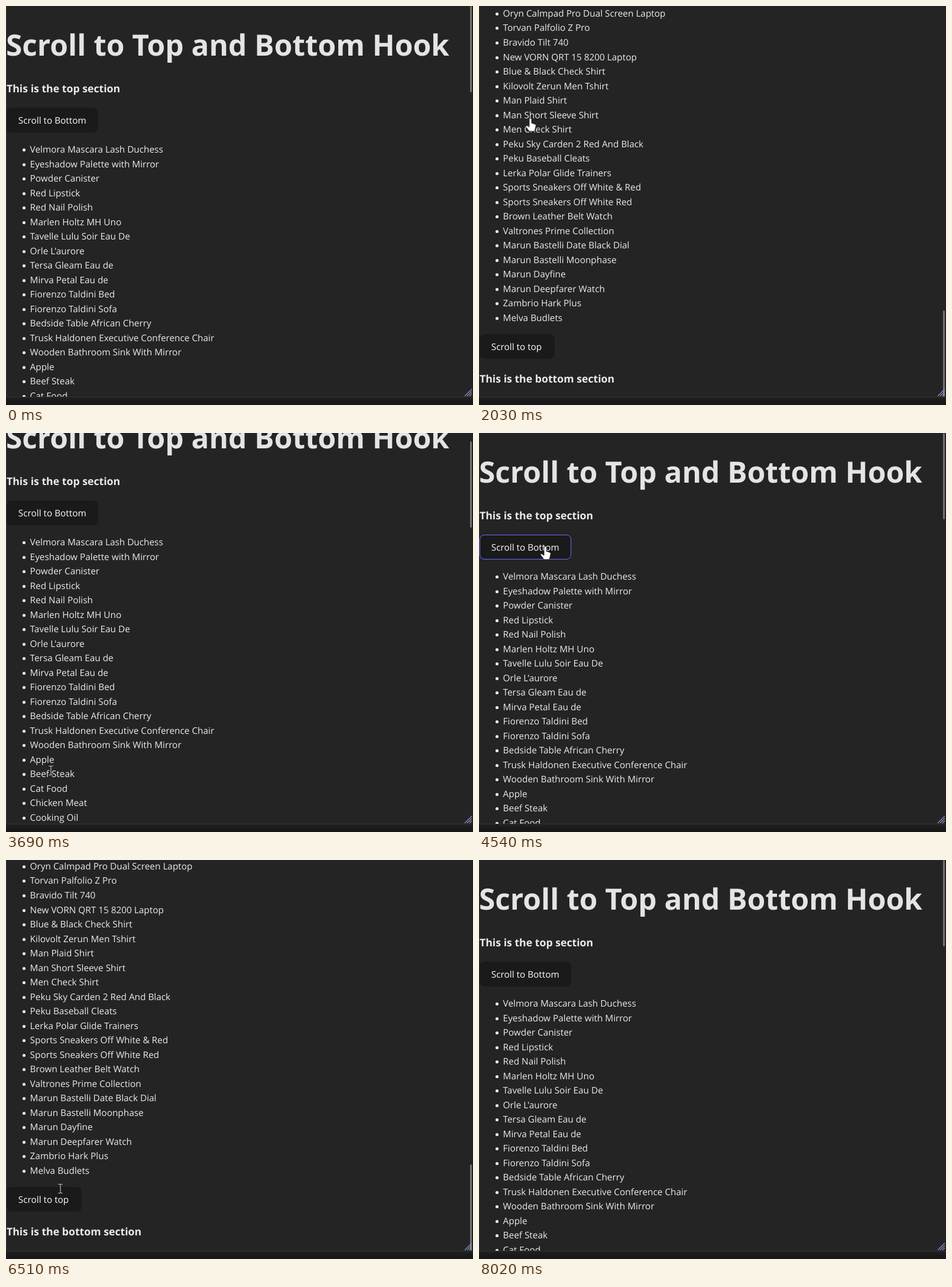
These frames come from a looping animation (790 by 675 pixels, 8480 ms). An HTML page:

```html
<!DOCTYPE html>
<html lang="en">
<head>
<meta charset="utf-8">
<title>Scroll hook demo</title>
<style>
  html, body { margin: 0; width: 100%; height: 100%; overflow: hidden; background: #242424; }
  svg { display: block; }
  text {
    font: 15.35px "Open Sans", "Noto Sans", sans-serif;
    fill: #ebebeb;
    text-rendering: geometricPrecision;
  }
  .h1 { font-size: 49.6px; font-weight: 700; fill: #e4e4e4; }
  .h3 { font-size: 17.7px; font-weight: 700; }
  .label { fill: #fafafa; }
  .button { fill: #1a1a1a; stroke: #1a1a1a; }
  .button.hover { stroke: #646cff; }
  .bullet { fill: #e8e8e8; }
</style>
</head>
<body>
<svg width="790" height="675" viewBox="0 0 790 675">
  <defs>
    <linearGradient id="shade" x2="0" y2="1">
      <stop offset="0" stop-color="#222223"/>
      <stop offset=".5" stop-color="#1a1a1b"/>
      <stop offset="1" stop-color="#17161a"/>
    </linearGradient>
  </defs>
  <rect width="790" height="675" fill="#242424"/>
  <g id="page"></g>
  <rect width="1" height="661" fill="#343436"/>
  <rect x="789" width="1" height="661" fill="#1c1c1d"/>
  <rect id="thumb" x="785" width="3" height="146" rx="1.5" fill="#757575"/>
  <path d="M776 660l12-12M780 660l8-8M784 660l4-4" stroke="#8c96d0" stroke-width="1.2" fill="none"/>
  <rect y="661" width="790" height="14" fill="url(#shade)"/>
  <rect y="661" width="790" height="1" fill="#333335"/>
  <g id="cursor">
    <path id="arrow" d="M0 0v16l4-4 3 6 2-1-3-6h5z" fill="#fff" stroke="#111" stroke-width=".8"/>
    <path id="hand" d="M-2 1q2-3 4 0v7l6 2q2 1 1 4l-2 8h-9l-6-8q0-3 3-1l3 2z" fill="#fff" stroke="#111" stroke-width=".8"/>
    <path id="beam" d="M-3.5-7.5h3l.5.5.5-.5h3M0-7V7M-3.5 7.5h3l.5-.5.5.5h3" fill="none" stroke="#d8d8d8"/>
  </g>
</svg>
<script>
const LOOP = 8480, MAX_SCROLL = 2145, THUMB_TRAVEL = 515, ROW = 24.525;
const SPRING = Math.sqrt(250) / 1000; // critically damped, per ms

const items = `Velmora Mascara Lash Duchess|Eyeshadow Palette with Mirror|Powder Canister|Red Lipstick|Red Nail Polish
Marlen Holtz MH Uno|Tavelle Lulu Soir Eau De|Orle L'aurore|Tersa Gleam Eau de|Mirva Petal Eau de
Fiorenzo Taldini Bed|Fiorenzo Taldini Sofa|Bedside Table African Cherry|Trusk Haldonen Executive Conference Chair|Wooden Bathroom Sink With Mirror
Apple|Beef Steak|Cat Food|Chicken Meat|Cooking Oil|Cucumber|Dog Food|Eggs|Fish Steak|Green Bell Pepper
Green Chili Pepper|Honey Jar|Ice Cream|Juice|Kiwi|Lemon|Milk|Mulberry|Roasted Coffee|Potatoes
Protein Powder|Red Onions|Rice|Soft Drinks|Strawberry|Tissue Paper Box|Water|Decoration Swing|Family Tree Photo Frame|House Showpiece Plant
Plant Pot|Table Lamp|Bamboo Spatula|Black Aluminium Cup|Black Whisk|Boxed Blender|Carbon Steel Wok|Chopping Board|Citrus Squeezer Yellow|Egg Slicer
Electric Stove|Fine Mesh Strainer|Fork|Glass|Grater Black|Hand Blender|Ice Cube Tray|Kitchen Sieve|Knife|Lunch Box
Microwave Oven|Mug Tree Stand|Pan|Plate|Red Tongs|Silver Pot With Glass Cap|Slotted Turner|Spice Rack|Spoon|Tray
Wooden Rolling Pin|Yellow Peeler|Melva LapNote Max 14 Inch Cloud Grey|Oryn Calmpad Pro Dual Screen Laptop|Torvan Palfolio Z Pro
Bravido Tilt 740|New VORN QRT 15 8200 Laptop|Blue & Black Check Shirt|Kilovolt Zerun Men Tshirt|Man Plaid Shirt
Man Short Sleeve Shirt|Men Check Shirt|Peku Sky Carden 2 Red And Black|Peku Baseball Cleats|Lerka Polar Glide Trainers
Sports Sneakers Off White & Red|Sports Sneakers Off White Red|Brown Leather Belt Watch|Valtrones Prime Collection|Marun Bastelli Date Black Dial
Marun Bastelli Moonphase|Marun Dayfine|Marun Deepfarer Watch|Zambrio Hark Plus|Melva Budlets`.split(/[|\n]/);

const $ = id => document.getElementById(id);
const page = $('page'), thumb = $('thumb'), cursor = $('cursor');

function add(tag, attrs, text = '') {
  const el = document.createElementNS('http://www.w3.org/2000/svg', tag);
  for (const k in attrs) el.setAttribute(k, attrs[k]);
  el.textContent = text;
  return page.appendChild(el);
}
const write = (x, y, text, cls = '') => add('text', { x, y, class: cls }, text);

function button(y, w, label) {
  const el = add('rect', { x: 1.5, y: y + .5, width: w - 1, height: 41, rx: 7.5 });
  write(20.8, y + 27, label, 'label');
  return { el, y, w };
}

write(0, 84, 'Scroll to Top and Bottom Hook', 'h1');
write(1, 146, 'This is the top section', 'h3');
items.forEach((name, i) => {
  const y = Math.round(248 + i * ROW);
  add('circle', { cx: 30.5, cy: y - 4.5, r: 2.6, class: 'bullet' });
  write(40.6, y, name);
});
const buttons = [button(172, 155, 'Scroll to Bottom'), button(2698, 127, 'Scroll to top')];
write(1, 2780, 'This is the bottom section', 'h3');

// Start times of the scrolls, alternately down and up
const scrolls = [1450, 3345, 5324, 7188];

// Pointer: time, x, y, shape from that time on
const path = [
  [0, 706, 617, ''], [200, 706, 617, 'arrow'], [820, 110, 205, 'hand'], [1020, 87, 190, 'hand'],
  [2170, 87, 190, 'beam'], [2740, 72, 562, 'hand'], [2880, 65, 582, 'hand'],
  [3400, 65, 582, 'beam'], [3620, 76, 571, 'beam'], [4040, 76, 571, 'beam'],
  [4420, 112, 205, 'hand'], [4540, 112, 192, 'hand'],
  [5400, 112, 192, 'beam'], [5680, 115, 310, 'beam'], [6090, 115, 310, 'beam'],
  [6520, 92, 556, 'hand'], [6650, 87, 570, 'hand'],
  [7400, 87, 570, 'arrow'], [7880, 700, 676, ''], [LOOP, 700, 676, '']
];

function scrollAt(t) {
  const i = scrolls.findLastIndex(s => t >= s);
  if (i < 0) return 0;
  const x = SPRING * (t - scrolls[i]), left = (1 + x) * Math.exp(-x);
  return Math.round(MAX_SCROLL * (i % 2 ? left : 1 - left));
}

function pointerAt(t) {
  const i = path.findLastIndex(k => t >= k[0]);
  const [t0, x0, y0, shape] = path[i], [t1, x1, y1] = path[i + 1];
  const u = (t - t0) / (t1 - t0), e = u * u * (3 - 2 * u);
  return { x: Math.round(x0 + (x1 - x0) * e), y: Math.round(y0 + (y1 - y0) * e), shape };
}

function draw(now) {
  const t = now % LOOP, scroll = scrollAt(t), p = pointerAt(t);
  page.setAttribute('transform', `translate(0 ${-scroll})`);
  thumb.setAttribute('y', Math.round(scroll / MAX_SCROLL * THUMB_TRAVEL));
  cursor.setAttribute('transform', `translate(${p.x} ${p.y})`);
  for (const el of cursor.children) el.style.display = el.id === p.shape ? '' : 'none';
  for (const b of buttons) {
    const dy = p.y + scroll - b.y;
    const over = p.shape === 'hand' && p.x <= b.w && dy >= 0 && dy <= 42;
    b.el.setAttribute('class', over ? 'button hover' : 'button');
  }
  requestAnimationFrame(draw);
}
draw(performance.now());
</script>
</body>
</html>
```
